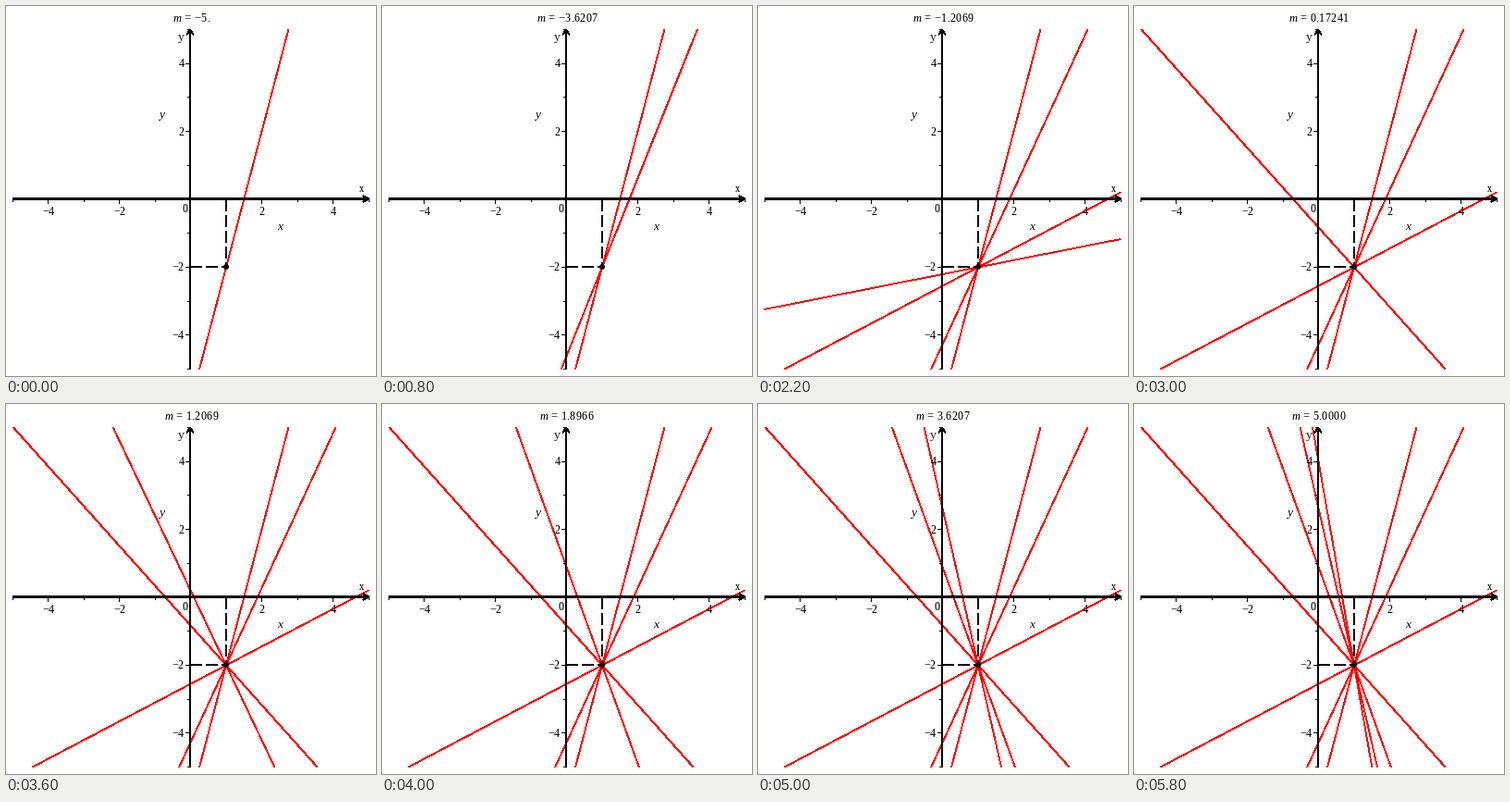
Write a matplotlib script that moves like this. It is 400x400 px and loops after 6000 ms.

```python
import numpy as np
import matplotlib.pyplot as plt
from matplotlib.animation import FuncAnimation
from matplotlib.patches import Circle, Rectangle

SIZE, DPI = 400, 100
FRAMES, INTERVAL = 30, 200
TRACE_STEP = 5
PT = 72 / DPI  # points per pixel
THIN = 0.8     # covers about two pixels without antialiasing

plt.rcParams.update({
    "font.family": "Liberation Serif",
    "mathtext.fontset": "custom",
    "mathtext.rm": "Liberation Serif",
    "mathtext.it": "Liberation Serif:italic",
    "text.hinting": "native",
    "text.hinting_factor": 1,
})

fig = plt.figure(figsize=(SIZE / DPI, SIZE / DPI), dpi=DPI, facecolor="white")
ax = fig.add_axes([0, 0, 1, 1])
ax.set(xlim=(0, SIZE), ylim=(SIZE, 0))
ax.axis("off")


def px(x):
    return 199.5 + 38.5 * x


def py(y):
    return 209 - 36.7 * y


def bar(x, y, w, h):
    ax.add_patch(Rectangle((x, y), w, h, fc="black", lw=0, aa=False, zorder=3))


def stroke(xs, ys, color="black", width=THIN, **kw):
    return ax.plot(xs, ys, color=color, lw=width * PT, antialiased=False,
                   solid_capstyle="butt", **kw)[0]


def label(x, y, s, ha="center", **kw):
    return ax.text(x, y, s, ha=ha, va="baseline", fontsize=13 * PT,
                   color="black", zorder=5, **kw)


def draw_axes():
    bar(7, 207, 386, 3)
    bar(198, 25, 2, 368)
    stroke([386, 392, 386], [205, 208.5, 212], zorder=3)
    stroke([195.5, 199, 202.5], [31, 25.5, 31], zorder=3)
    for v in range(-5, 6):
        if v == 0:
            continue
        major = v % 2 == 0
        size = 4 if major else 2
        bar(int(px(v)), 210, 1, size)
        bar(198 - size, int(py(v)), size, 1)
        if major:
            text = str(v).replace("-", "\u2212")
            label(px(v), 226, text)
            label(192.5, py(v) + 4, text, ha="right")
    label(194, 223, "0")
    label(383.5, 201, "x")
    label(189, 37, "y")
    label(296, 242, "x", style="italic")
    label(168, 121, "y", style="italic")


def draw_point():
    dash = dict(width=2, dashes=(6.5, 2.5), zorder=3)
    stroke([px(1), px(1)], [209, py(-2)], **dash)
    stroke([199, px(1)], [282, 282], **dash)
    ax.add_patch(Circle((px(1), 282), 3, fc="black", lw=0, zorder=4))


def param(k):
    return -5 + 10 * k / (FRAMES - 1)


def segment(k):
    """Line through (1, -2) with slope -m - 1, cut to the 10 by 10 window."""
    slope = -param(k) - 1
    ends = sorted([1 - 3 / slope, 1 + 7 / slope])
    x = np.clip(ends, -5, 5)
    return px(x), py(slope * (x - 1) - 2)


def title_text(k):
    value = "-5." if k == 0 else f"{param(k):#.5g}"
    return "$m$ = " + value.replace("-", "\u2212")


draw_axes()
draw_point()
title = label(200.5, 17, title_text(0))
current = stroke(*segment(0), color="red", zorder=2)
traces = [(k, stroke(*segment(k), color="red", zorder=2))
          for k in range(0, FRAMES, TRACE_STEP)]


def update(k):
    title.set_text(title_text(k))
    current.set_data(*segment(k))
    for start, line in traces:
        line.set_visible(start <= k)
    return [title, current] + [line for _, line in traces]


anim = FuncAnimation(fig, update, frames=FRAMES, interval=INTERVAL,
                     repeat=True, repeat_delay=0, blit=False)
plt.show()
```
